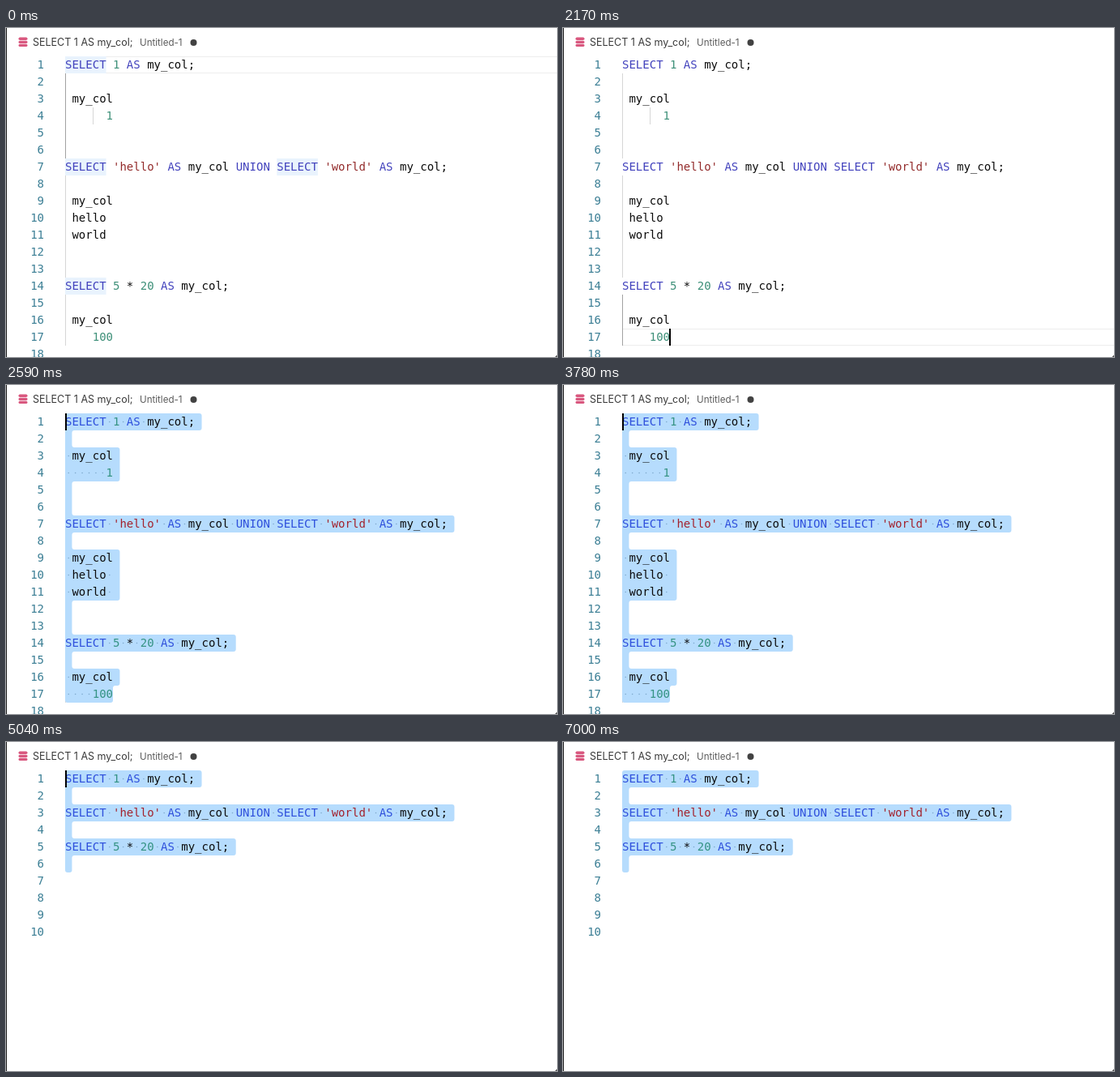
Animation, 680 px wide and 406 px high, one loop 7070 ms. Source, as an HTML page:

```html
<!DOCTYPE html>
<html lang="en">
<head>
<meta charset="utf-8">
<title>Query editor</title>
<style>
  html, body { margin: 0; width: 100%; height: 100%; overflow: hidden; background: #fff; }
  svg { display: block; width: 680px; height: 406px; }
  text { white-space: pre; }
  .code { font: 14px "DejaVu Sans Mono", monospace; fill: #0c0c0c; }
  .num { fill: #3c7f95; text-anchor: end; }
  .kw { fill: #4343bd; }
  .str { fill: #932b2b; }
  .val { fill: #3e9079; }
  .sel .kw { fill: #2f50dc; }
  .sel .str { fill: #a3222c; }
  .sel .val { fill: #359383; }
  .dot { fill: #7fa9cc; }
  .word { fill: #e9f3fd; }
  .guide { fill: #d6d6d6; }
  .guide.active { fill: #a2a2a2; }
  .tab { font: 12.5px Inter, sans-serif; fill: #3a3a3a; }
  .tab .note { font-size: 11.6px; fill: #5a5a5a; }
</style>
</head>
<body>
<svg id="stage" viewBox="0 0 680 406">
  <g fill="#d9587f">
    <rect x="15.5" y="11.5" width="11" height="3.4" rx="1.7"/>
    <rect x="15.5" y="15.7" width="11" height="3.2" rx="1.5"/>
    <rect x="15.5" y="19.7" width="11" height="3.4" rx="1.7"/>
  </g>
  <g class="tab">
    <text x="33" y="22">SELECT 1 AS my_col;</text>
    <text class="note" x="165" y="22">Untitled-1</text>
    <circle cx="231.5" cy="18" r="4" fill="#424242"/>
  </g>
</svg>
<script>
const LOOP = 7070, STEP = 70;
const CLICK = 2100, DRAG = 2170, DRAG_END = 2590, COLLAPSE = 5040, BLINK = 500;
const LEFT = 73, TOP = 35, LINE = 21, CHAR = 8.428;

const queries = [
  "SELECT 1 AS my_col;",
  "SELECT 'hello' AS my_col UNION SELECT 'world' AS my_col;",
  "SELECT 5 * 20 AS my_col;"
];
const full = [
  queries[0], "", " my_col", "      1", "", "",
  queries[1], "", " my_col", " hello ", " world ", "", "",
  queries[2], "", " my_col", "    100", ""
];
const short = [queries[0], "", queries[1], "", queries[2], "", "", "", "", ""];

// pointer while dragging: time, row, column
const drag = [[DRAG, 16, 7], [2380, 8, 4], [DRAG_END, 0, 0]];

const stage = document.getElementById("stage");
const colX = col => LEFT + col * CHAR;
const rowY = row => TOP + row * LINE;
const show = (node, on) => node.setAttribute("visibility", on ? "inherit" : "hidden");

function add(parent, tag, attrs, text) {
  const node = document.createElementNS("http://www.w3.org/2000/svg", tag);
  for (const key in attrs) node.setAttribute(key, attrs[key]);
  if (text !== undefined) node.textContent = text;
  parent.appendChild(node);
  return node;
}

function kind(token) {
  if (/^(SELECT|AS|UNION)$/.test(token)) return "kw";
  if (token[0] === "'") return "str";
  return /^\d/.test(token) ? "val" : "";
}

// indent guides, active word marks and the current line frame
const border = add(stage, "g", { fill: "#ededed" });
for (const y of [0, 20]) add(border, "rect", { x: LEFT, y, width: 680 - LEFT, height: 1 });

const words = add(stage, "g", { class: "word" });
full.forEach((line, row) => {
  for (const m of line.matchAll(/SELECT/g)) {
    add(words, "rect", { x: colX(m.index), y: rowY(row), width: 6 * CHAR, height: LINE });
  }
});

const guides = add(stage, "g", {});
const blocks = [[1, 6], [7, 13], [14, 17]].map(([from, to]) => add(guides, "rect", {
  class: "guide", x: LEFT, y: rowY(from), width: 1, height: (to - from) * LINE
}));
add(guides, "rect", { class: "guide", x: 107, y: rowY(3), width: 1, height: LINE });

const selection = add(stage, "path", { fill: "#b6dcfd" });

function makeDoc(lines) {
  const group = add(stage, "g", { class: "code" });
  const dots = [];
  const rows = lines.map((line, row) => {
    const base = rowY(row) + 15;
    add(group, "text", { class: "num", x: 47, y: base }, row + 1);
    const g = add(group, "g", {});
    for (const m of line.matchAll(/'[^']*'|\w+|[^\s\w]+| /g)) {
      const col = m.index;
      if (m[0] === " ") {
        const node = add(g, "circle", { class: "dot", cx: colX(col + .5), cy: base - 4.5, r: .8 });
        dots.push({ node, row, col });
      } else {
        add(g, "text", { class: kind(m[0]), x: colX(col), y: base }, m[0]);
      }
    }
    return g;
  });
  return { group, lines, rows, dots };
}
const before = makeDoc(full), after = makeDoc(short);
const caret = add(stage, "rect", { width: 2, height: LINE, fill: "#000" });
add(stage, "rect", { width: 1, height: 406, fill: "#1c1c1c" });
add(stage, "path", { d: "M680 403.5V406H677.5Z", fill: "#555" });

// closed outline with every inner and outer corner rounded
function roundPath(points, r) {
  const toward = (a, b) => {
    const d = Math.hypot(b[0] - a[0], b[1] - a[1]);
    const k = Math.min(r, d / 2) / d;
    return [a[0] + (b[0] - a[0]) * k, a[1] + (b[1] - a[1]) * k];
  };
  const pts = points.filter((p, i) => {
    const q = points[(i + points.length - 1) % points.length];
    return p[0] !== q[0] || p[1] !== q[1];
  });
  return pts.map((p, i) => {
    const prev = pts[(i + pts.length - 1) % pts.length], next = pts[(i + 1) % pts.length];
    return `${i ? "L" : "M"}${toward(p, prev)}Q${p} ${toward(p, next)}`;
  }).join("") + "Z";
}

function outline(lines, start, end) {
  const pts = [[colX(start.col), rowY(start.row)]];
  for (let row = start.row; row <= end.row; row++) {
    const x = colX(row === end.row ? end.col : lines[row].length + 1);
    pts.push([x, rowY(row)], [x, rowY(row + 1)]);
  }
  pts.push([LEFT, rowY(end.row + 1)]);
  if (start.col > 0) pts.push([LEFT, rowY(start.row + 1)], [colX(start.col), rowY(start.row + 1)]);
  return roundPath(pts, 3);
}

function pointer(t) {
  if (t >= DRAG_END) return { row: 0, col: 0 };
  const i = t < drag[1][0] ? 0 : 1;
  const [t0, r0, c0] = drag[i], [t1, r1, c1] = drag[i + 1];
  const k = Math.max(0, (t - t0) / (t1 - t0));
  const row = Math.round(r0 + (r1 - r0) * k);
  const col = Math.round(c0 + (c1 - c0) * k);
  return { row, col: Math.min(col, full[row].length) };
}

function caretOn(t) {
  if (t < CLICK) return false;
  const since = t >= COLLAPSE ? COLLAPSE : t >= DRAG_END ? DRAG_END : t;
  return Math.floor((t - since) / BLINK) % 2 === 0;
}

function draw(t) {
  const collapsed = t >= COLLAPSE, selecting = t > DRAG;
  const doc = collapsed ? after : before;
  const start = pointer(t);
  const end = collapsed ? { row: 5, col: 1 } : { row: 16, col: 7 };

  show(before.group, !collapsed);
  show(after.group, collapsed);
  show(words, t < CLICK);
  show(guides, !collapsed);
  show(border, !selecting);
  border.setAttribute("transform", `translate(0 ${rowY(t < CLICK ? 0 : 16)})`);
  const active = selecting ? -1 : t < CLICK ? 0 : 2;
  blocks.forEach((b, i) => b.classList.toggle("active", i === active));

  selection.setAttribute("d", selecting ? outline(doc.lines, start, end) : "");
  doc.rows.forEach((g, row) => {
    g.classList.toggle("sel", selecting && row >= start.row && row <= end.row);
  });
  for (const { node, row, col } of doc.dots) {
    const inside = row > start.row || (row === start.row && col >= start.col);
    show(node, selecting && inside);
  }

  show(caret, caretOn(t));
  caret.setAttribute("x", Math.floor(colX(start.col)));
  caret.setAttribute("y", rowY(start.row));
}

const begin = performance.now();
function tick() {
  const t = (performance.now() - begin) % LOOP;
  draw(Math.floor(t / STEP) * STEP);
  requestAnimationFrame(tick);
}
tick();
</script>
</body>
</html>
```
